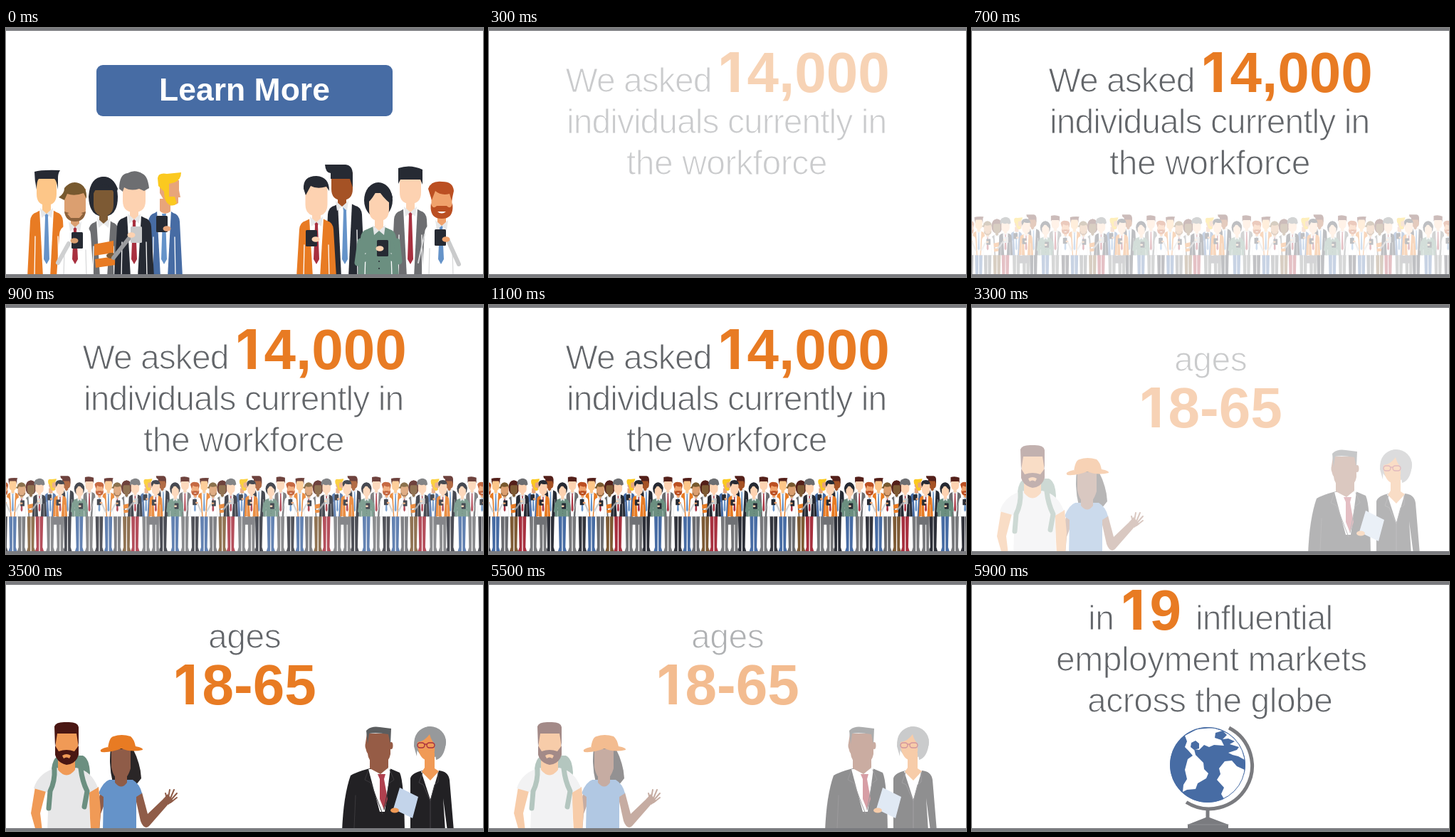
An HTML page that plays this animation: 670x350 px, repeating every 8 s.

```html
<!DOCTYPE html>
<html lang="en">
<head>
<meta charset="utf-8">
<title>Workforce survey</title>
<style>
html, body { margin: 0; width: 100%; height: 100%; overflow: hidden; background: #fff; }
svg { display: block; width: 670px; height: 350px; }
text { font-family: "Liberation Sans", Arial, sans-serif; }
.light { font-size: 48px; letter-spacing: -.01em; fill: #626569; stroke: #fff; stroke-width: 1.2px; }
.tight { letter-spacing: -.02em; }
.num { font-size: 80px; font-weight: 700; fill: #e87b23; }
.one { font: 700 77px Inter, sans-serif; text-anchor: end; }
.hair { fill: var(--hair, #262a33); }
#crowd { --hair: #54201a; }
</style>
</head>
<body>
<svg id="stage" viewBox="0 0 670 350"></svg>
<script>
const ORANGE = '#e87b23', DARK = '#262a33', GRAY = '#6d6e71', BLUE = '#476ca4', SKY = '#6593c9',
  RED = '#a8303f', GREEN = '#6b8f80', PEACH = '#fdd2b1', BAR = '#7a7b7f', BLACK = '#222124';

const fill = (d, color) => `<path d="${d}" fill="${color}"/>`;
const hair = d => `<path class="hair" d="${d}"/>`;
const line = (d, color, w) => `<path d="${d}" fill="none" stroke="${color}" stroke-width="${w}" stroke-linecap="round" stroke-linejoin="round"/>`;
const oval = (x, y, rx, ry, color) => `<ellipse cx="${x}" cy="${y}" rx="${rx}" ry="${ry}" fill="${color}"/>`;
const box = (x, y, w, h, color, r = 0) => `<rect x="${x}" y="${y}" width="${w}" height="${h}" rx="${r}" fill="${color}"/>`;
const light = (x, y, s, tight = '') => `<text class="light ${tight}" x="${x}" y="${y}">${s}</text>`;
// A big number whose leading 1 has no foot
const num = (x, y, rest) => `<text class="num" y="${y}"><tspan class="one" x="${x + 39}">1</tspan><tspan x="${x + 45.5}">${rest}</tspan></text>`;

// c: centre, s: shoulder height, w: half width
function body(c, s, w, coat, tie, legs) {
  const white = coat === '#fff';
  let out = '';
  for (const k of [-1, 1])
    out += fill(`M${c + k} 340H${c + k * 15}L${c + k * 12} 470L${c + k * 17} 486H${c + k * 2}Z`, legs);
  out += fill(`M${c - w - 4} 350L${c - w} ${s + 12}Q${c - w + 1} ${s + 2} ${c - w + 9} ${s}L${c - 7} ${s - 4}H${c + 7}L${c + w - 9} ${s}Q${c + w - 1} ${s + 2} ${c + w} ${s + 12}L${c + w + 4} 350Z`, coat);
  for (const k of [-1, 1])
    out += line(`M${c + k * (w - 7)} ${s + 34}L${c + k * (w - 6)} 350`, white ? '#d9dadb' : '#fff', 1.3);
  if (tie) {
    if (!white) out += fill(`M${c - 10} ${s - 4}H${c + 10}L${c + 5} 350H${c - 5}Z`, '#fff');
    out += fill(`M${c - 3} ${s + 1}H${c + 3}L${c + 2} ${s + 7}L${c + 4} 325L${c} 332L${c - 4} 325L${c - 2} ${s + 7}Z`, tie);
  }
  return out;
}
const head = (c, top, chin, h, skin, s) =>
  fill(`M${c - 6} ${chin - 8}H${c + 6}V${s - 2}Q${c} ${s + 6} ${c - 6} ${s - 2}Z`, skin)
  + fill(`M${c - 9} ${s - 6}L${c} ${s + 2}L${c - 7} ${s + 8}ZM${c + 9} ${s - 6}L${c} ${s + 2}L${c + 7} ${s + 8}Z`, '#e6e7e8')
  + fill(`M${c - h} ${top}H${c + h}V${chin - 16}Q${c + h} ${chin} ${c} ${chin}Q${c - h} ${chin} ${c - h} ${chin - 16}Z`, skin);
const phone = (x, y, hx, hy, skin, color = DARK) =>
  box(x, y, 16, 23, color, 1.5) + oval(hx, hy, 5.5, 3.8, skin);

// Each entry, back to front: centre in the crowd, drawing
const people = {
  orange: [9.5, body(57, 259, 23, ORANGE, SKY, BLUE) + head(57, 208, 249, 14, '#fdc688', 259)
    + hair('M40 202Q50 199 76 200Q73 204 73 211V227Q71 214 68 212H46Q43 215 43 227Q40 214 40 202Z')],
  woman: [35, hair('M116 237Q118 209 137 209Q156 211 157 237Q157 265 137 265Q117 265 116 237Z')
    + body(137, 273, 21, GRAY, '#fff', '#7d5a34') + head(137, 228, 264, 14, '#7d5a34', 273)
    + hair('M121 240Q124 222 139 220Q152 224 153 240L157 226Q150 208 136 209Q120 212 118 230Z')
    + fill('M124 304L151 299V316L124 320ZM125 325L152 321L154 333L126 337Z', ORANGE) + oval(148, 320, 7, 4, '#7d5a34')],
  blond: [63, body(222, 260, 22, BLUE, SKY, '#77787b')
    + fill('M216 240H231V258Q223 264 216 257Z', '#e8a57a')
    + fill('M216 214H243V228L245 238H242V246Q237 250 226 249L216 232Z', '#e8a57a')
    + fill('M213 211Q214 203 226 205L246 203Q246 213 237 217L229 219V237H237L240 246Q236 251 230 249Q222 245 222 230L214 222Z', '#fbc91f')
    + phone(211, 264, 226, 282, '#e8a57a')],
  brown: [85, body(476, 250, 24, DARK, SKY, '#2b2e37') + head(472, 203, 242, 15, '#a55225', 249)
    + hair('M448 192H477Q487 193 487 206V224L483 212H456V204Q449 204 448 192Z')],
  suit: [117, body(568, 257, 23, GRAY, RED, '#77787b') + head(568, 208, 247, 15, PEACH, 257)
    + hair('M551 197Q568 191 585 199V220L582 213H554L551 219Z')],
  white: [22, body(97, 278, 22, '#fff', RED, '#6a6b6f') + line('M88 303L73 330', '#cfd0d1', 6)
    + head(97, 226, 271, 15, '#db9f70', 278)
    + fill('M82 258Q97 264 112 258Q110 272 97 272Q84 272 82 258Z', '#8d623c')
    + fill('M86 261Q97 256 108 261L103 267H91Z', '#db9f70')
    + fill('M74 238Q82 233 82 225Q91 214 102 218Q114 222 113 240L109 232Q96 237 86 233L82 242Z', '#77592f')
    + phone(92, 287, 96, 299, '#db9f70')],
  silver: [47, body(180, 267, 24, DARK, RED, RED) + line('M151 323L174 294', '#9b9c9f', 6)
    + head(180, 212, 259, 16, PEACH, 267)
    + fill('M159 226Q159 205 171 204Q181 198 192 205Q199 208 201 225L194 229L187 226Q175 230 166 224L164 230Z', GRAY)
    + phone(175, 279, 176, 291, PEACH, '#c9cacb')],
  orange2: [76, body(436, 271, 24, ORANGE, RED, '#77787b') + head(436, 219, 264, 15.5, PEACH, 271)
    + fill('M418 226Q417 208 436 208Q454 209 454 229L450 223Q437 227 428 222L421 235Z', DARK)
    + phone(421, 284, 435, 297, PEACH) + box(404, 352, 42, 30, '#6f7175', 3)],
  green: [103, oval(523, 242, 20, 25, DARK) + body(523, 283, 25, GREEN, '', BLUE)
    + line('M498 300L494 330L516 316M549 300L552 328L536 320', GREEN, 9)
    + head(524, 232, 271, 14, PEACH, 283)
    + fill('M507 247Q515 240 522 226Q529 238 539 246L543 238Q538 217 523 218Q506 219 505 241Z', DARK)
    + oval(524, 328, 1, 1, DARK) + oval(524, 338, 1, 1, DARK) + phone(521, 298, 525, 310, PEACH)],
  ginger: [131, body(611, 276, 23, '#fff', SKY, '#33353d') + line('M588 290L579 330', '#d5d6d7', 2)
    + line('M621 299L636 332', '#cacbcc', 6) + head(612, 224, 268, 14.5, '#f0a26c', 276)
    + fill('M597 246Q599 256 605 250H619Q625 256 627 246Q630 268 612 268Q594 268 597 246Z', '#bb4f22')
    + fill('M606 258H618Q612 263 606 258Z', '#fff')
    + fill('M593 226Q597 214 613 216Q628 216 629 229L626 243L623 233Q611 236 603 229L598 242Z', '#bb4f22')
    + phone(602, 283, 618, 297, '#f0a26c')]
};
const centres = { orange: 57, woman: 137, blond: 224, brown: 472, suit: 568, white: 97, silver: 180, orange2: 436, green: 523, ginger: 611 };
const names = Object.keys(people);
const use = n => `<use href="#${n}"/>`;

let crowd = '';
for (const n of names)
  for (let k = -1; k < 6; k++)
    crowd += `<use href="#${n}" transform="translate(${people[n][0] + 134.4 * k - .36 * centres[n]} 171.2) scale(.36)"/>`;

const hiker =
  fill('M64 268Q64 246 76 244H108Q117 248 118 268L112 310H66Z', GREEN)
  + fill('M41 288L56 294L48 325L51 350H42L35 325ZM116 294L130 288L133 320L131 350H119Z', '#f09a56')
  + fill('M72 261Q84 274 98 261Q120 265 129 289L117 296L118 350H58L60 296L39 290Q46 267 72 261Z', '#e7e7e8')
  + fill('M73 246H97V264Q85 279 73 264Z', '#f09a56')
  + line('M68 262Q69 280 62 294L60 318M105 262Q107 280 114 294L110 316', GREEN, 7)
  + fill('M70 212H101V240Q99 256 85 256Q72 256 70 240Z', '#f09a56')
  + fill('M69 230L74 238Q85 234 96 238L102 230V243Q98 256 85 257Q72 254 69 243Z', '#4a1713')
  + fill('M79 244Q85 240 91 244L89 248Q85 245 81 248Z', '#f09a56')
  + fill('M68 203Q70 196 85 197Q101 196 102 204V232L99 213H72L69 232Z', '#4a1713');

const traveller =
  fill('M147 234H178Q189 255 190 276L182 286L150 282Q144 258 147 234Z', '#2a2627')
  + fill('M132 298L142 302L133 326L131 350H124V330Z', '#8f5c48')
  + fill('M181 300L191 296L199 326L222 304L229 311L201 343Q194 349 189 336Z', '#8f5c48')
  + fill('M221 305L227 298L232 304L235 308L228 313Z', '#8f5c48')
  + line('M226 304L224 297M228 303L230 292M231 304L236 292M232 306L240 297M231 310L240 303', '#8f5c48', 2)
  + fill('M145 278H178Q188 284 191 297L183 302V350H136L137 302L130 297Q136 281 145 278Z', SKY)
  + fill('M153 264H170V282Q162 293 153 282Z', '#8f5c48')
  + fill('M148 235H175V262Q170 279 161 279Q151 277 148 260Z', '#8f5c48')
  + fill('M143 234Q145 218 151 217Q162 213 175 217Q180 221 182 231Q193 233 192 236Q176 240 162 234Q148 240 134 239Q129 235 143 232Z', ORANGE);

const executive =
  fill('M472 350Q474 300 484 272Q492 267 511 262H539L553 268Q559 280 560 350Z', BLACK)
  + fill('M509 263L525 323H532L540 262Z', '#fff')
  + fill('M511 240H537V261L526 270L511 262Z', '#965c46')
  + fill('M522 270H533L531 277L536 305L531 320L525 305L525 277Z', '#b0404e')
  + line('M509 264L504 278L512 282L529 326M539 264L545 278L538 283L531 320M491 300L489 346', '#3b393c', 1)
  + fill('M507 213H540V242Q538 253 530 254H517Q509 252 508 241Q505 238 505 226Z', '#965c46')
  + oval(507, 230, 2.5, 5, '#965c46') + oval(541, 230, 2.5, 5, '#965c46')
  + fill('M506 209Q512 202 525 204L541 206L540 228L537 214Q520 211 510 213L508 228Z', '#5b5d5f');

const manager =
  oval(596, 225, 22, 22, '#97999b')
  + fill('M568 350V276Q570 268 586 265H608Q621 266 623 278L629 350H620L614 304L617 350Z', BLACK)
  + fill('M583 266L596 306L608 265Z', '#fff')
  + fill('M588 240H602V262L608 266L596 279L584 267L588 261Z', '#f09a56')
  + fill('M577 226Q583 211 596 211Q602 220 603 234Q600 250 590 250Q580 248 577 226Z', '#f09a56')
  + fill('M573 231Q572 207 594 203Q616 206 618 225Q616 247 604 250L601 226Q597 222 595 214Q588 224 578 225L577 245Z', '#97999b')
  + `<g fill="none" stroke="${RED}" stroke-width="1.4"><rect x="578" y="226" width="10" height="7" rx="3.5"/><rect x="591" y="226" width="11" height="7" rx="3.5"/><path d="M588 228h3"/></g>`
  + line('M585 268L580 282L586 285L596 308L602 285L607 281L607 268M596 308V346', '#444246', 1)
  + fill('M553 289L579 302L571 332L544 319Z', '#c3d4ea') + oval(546, 321, 6, 3.5, '#f09a56');

const globe =
  `<circle cx="331" cy="257" r="53" fill="${BLUE}"/>`
  + fill('M299 216L316 207L338 205L352 209L342 212L341 219L350 222L354 230L340 229L333 232L326 229L319 236L312 235L314 243L325 254L326 263L332 269L329 276L317 283L314 291L302 292L296 295L297 285L302 277L299 264L303 249L310 244L304 237L299 232L302 224Z', '#fff')
  + fill('M308 226L314 223L319 227L319 234L312 236L307 232Z', BLUE)
  + fill('M353 210L362 214L373 224L380 236L383 250L374 245L366 243L360 240L372 236L375 232L362 228L369 224L360 220L352 221L358 215Z', '#fff')
  + fill('M347 262L355 252L365 251L372 259L383 264L382 277L374 291L362 301L354 305L350 298L354 289L344 278L349 270Z', '#fff')
  + `<circle cx="331" cy="257" r="52.5" fill="none" stroke="${BLUE}"/>`
  + `<path d="M361 205A60.3 60.3 0 1 1 301 309.5" fill="none" stroke="${BAR}" stroke-width="5"/>`
  + box(328.5, 317, 5, 14, BAR) + fill('M303 347V341L331 330L360 341V347Z', BAR)
  + line('M303 341H360', '#96979a', .8);

const stage = document.getElementById('stage');
stage.innerHTML = `<defs>${names.map(n => `<g id="${n}">${people[n][1]}</g>`).join('')}</defs>
<g id="invite">${box(127, 52, 416, 72, BLUE, 9)}
  <text x="335" y="102" text-anchor="middle" font-size="44.5" font-weight="700" fill="#fff">Learn More</text>
  ${names.map(use).join('')}</g>
<g id="asked">${light(107.5, 90, 'We asked', 'tight')}${num(317, 90, '4,000')}
  ${light(109, 148, 'individuals currently in', 'tight')}${light(193, 206, 'the workforce')}
  <g id="crowd">${crowd}</g></g>
<g id="ages">${light(284, 93, 'ages')}${num(230, 172, '8-65')}${traveller}${hiker}${executive}${manager}</g>
<g id="markets">${light(163, 67, 'in')}${num(204, 67, '9')}${light(314, 67, 'influential', 'tight')}
  ${light(118, 125, 'employment markets')}${light(162, 183, 'across the globe')}${globe}</g>
${box(0, 0, 670, 4, BAR)}${box(0, 346, 670, 4, BAR)}`;

const el = id => document.getElementById(id);
// Scene, step it starts to enter, step it starts to leave; a step is 100 ms
const scenes = [['invite', -9, 1], ['asked', 1, 31], ['ages', 31, 55], ['markets', 55, 99]];
const clamp = v => Math.max(0, Math.min(1, v));
const rise = [[22, .3], [10, .6], [0, .85], [-4, 1], [0, 1]];

function draw(now) {
  const step = Math.floor(now % 8000 / 100);
  for (const [id, enter, leave] of scenes) {
    const alpha = step < leave ? clamp((step - enter - 1) / 3) : step === leave ? .5 : 0;
    el(id).style.opacity = alpha;
    el(id).style.display = alpha ? '' : 'none';
  }
  const [dy, alpha] = step < 7 ? [22, 0] : rise[Math.min(step - 7, 4)];
  el('crowd').setAttribute('transform', `translate(0 ${dy})`);
  el('crowd').style.opacity = alpha;
}
const start = performance.now();
function tick() {
  draw(performance.now() - start);
  requestAnimationFrame(tick);
}
tick();
</script>
</body>
</html>
```
